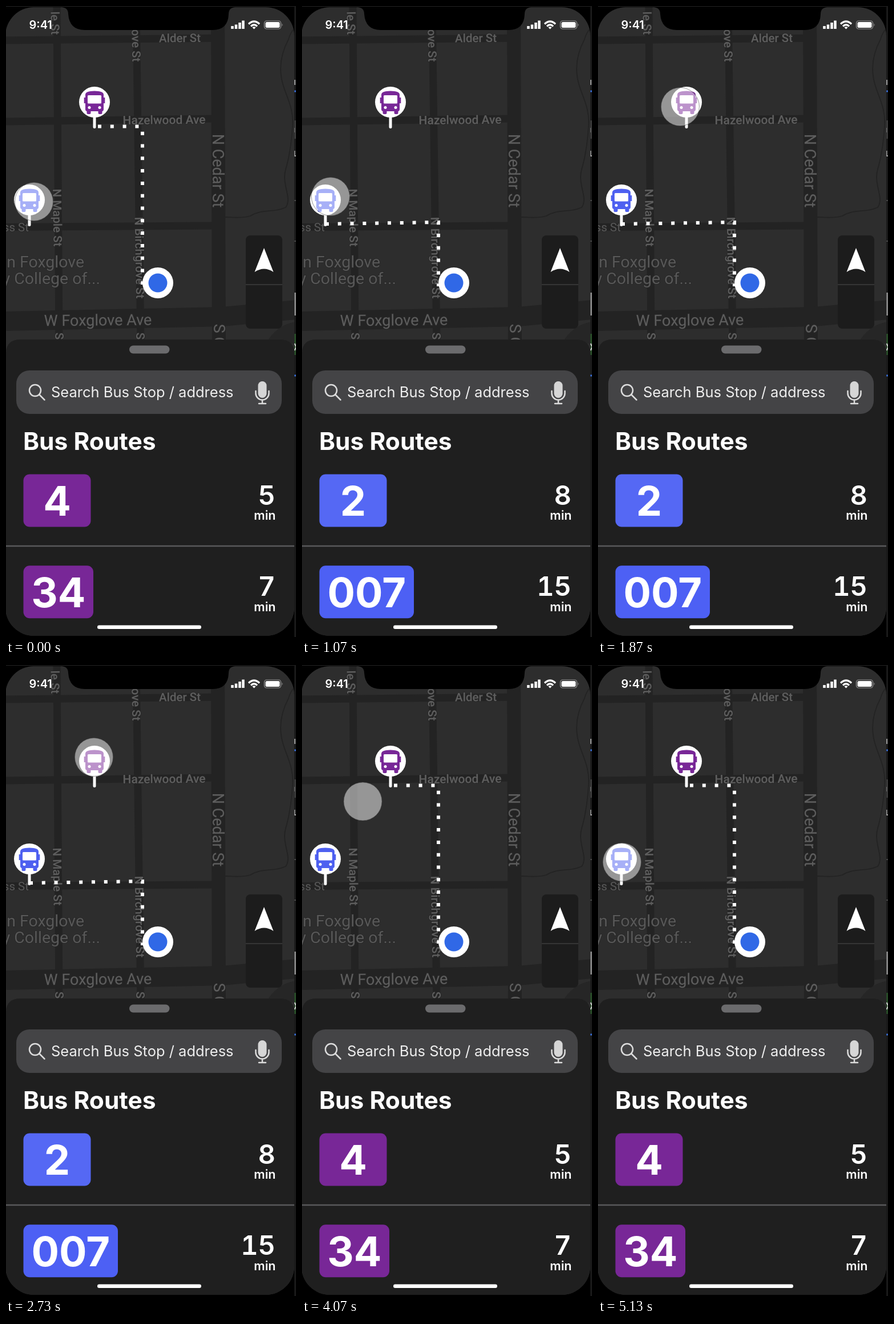
Write an HTML page that moves like this. It is 508 by 1103 pixels and loops after 5.19 s.

```html
<!DOCTYPE html>
<html lang="en">
<head>
<meta charset="utf-8">
<title>Bus stops</title>
<style>
  html, body { margin: 0; width: 100%; height: 100%; overflow: hidden; background: #000; }
  svg { display: block; width: 508px; height: 1103px; }
  text { font-family: Inter, "Liberation Sans", sans-serif; fill: #fff; }
  #labels text {
    font-family: Roboto, "Open Sans", sans-serif; font-weight: 500; fill: #5e5e5e;
    stroke: #282828; stroke-width: 2px; paint-order: stroke; text-anchor: middle;
  }
  #labels .wide { font-weight: 400; }
  #labels .place { font-weight: 400; fill: #585858; text-anchor: end; }
  #roads path { fill: none; stroke: #232323; }
  .route { fill: none; stroke: #fff; stroke-width: 6; stroke-dasharray: 6 15.8; }
  .num { font-size: 72px; font-weight: 700; text-anchor: middle; }
  .wait { font-size: 47px; font-weight: 600; text-anchor: end; font-variant-numeric: tabular-nums; }
  .min { font-size: 21.5px; font-weight: 600; text-anchor: end; }
</style>
</head>
<body>
<svg viewBox="0 0 508 1103">
  <defs>
    <clipPath id="screen"><rect x="-1" y="2" width="506" height="1099" rx="50"/></clipPath>
    <g id="bus">
      <path d="M-16 -13Q-16 -19.500 0 -19.500T16 -13V12.500Q16 16 12.500 16H-12.500Q-16 16 -16 12.500Z"/>
      <path d="M-18.300 -8h3v10h-3zM15.300 -8h3v10h-3zM-13.500 15h7v4q0 2-2 2h-3q-2 0-2-2zM6.500 15h7v4q0 2-2 2h-3q-2 0-2-2z"/>
      <g fill="#fff">
        <rect x="-12" y="-12" width="24" height="14.500" rx="1.500"/>
        <circle cx="-9" cy="9.500" r="2.500"/><circle cx="9" cy="9.500" r="2.500"/>
      </g>
    </g>
    <g id="pin">
      <path d="M0 25V43.500" stroke="#fff" stroke-width="5" stroke-linecap="round"/>
      <circle r="27" fill="#fff"/>
      <use href="#bus"/>
    </g>
  </defs>

  <!-- window edge beside the phone -->
  <rect width="508" height="1103" fill="#000"/>
  <path d="M0 .5H508" stroke="#242424"/>
  <rect x="505" width="3" height="1103" fill="#191919"/>
  <g fill="none" stroke-width="2">
    <path d="M506 129v9M506 213v8M505.500 253v9h3" stroke="#999"/>
    <path d="M505 149h3M505 646h3" stroke="#3565c4" stroke-width="3"/>
    <path d="M506.500 200v32M505 340h3M505 411h3" stroke="#444"/>
    <path d="M506.500 501v40" stroke="#aaa"/>
    <path d="M506.500 573v37" stroke="#274a27" stroke-width="3"/>
    <path d="M505.500 590l3 6l-3 6" stroke="#ccc"/>
  </g>

  <g clip-path="url(#screen)">
    <rect width="505" height="1103" fill="#2d2d2d"/>
    <g id="roads">
      <path d="M0 60L383 56M0 202L362 197M0 386.500L361 384M89 0L93 590M228 0L236 590" stroke-width="13"/>
      <path d="M371 0L373 590" stroke-width="24"/>
      <path d="M0 551L380 543L508 531" stroke-width="34"/>
      <path d="M508 36C500 44 497 50 495 58C481 84 477 112 486 140C493 162 504 180 502 210C500 240 497 262 490 285C482 312 502 335 490 352C470 362 448 354 428 367C412 372 398 369 384 369" stroke-width="1.800"/>
      <path d="M455 590Q475 556 508 552V590Z" style="fill:#262626;stroke:none"/>
    </g>
    <g id="labels"></g>
    <path id="routeA" class="route" d="M161 210.500H239V487"/>
    <path id="routeB" class="route" d="M41 381L239 378V490"/>
    <use href="#pin" x="155" y="168" fill="#782797"/>
    <use href="#pin" x="41" y="339" fill="#4e60f0"/>
    <circle cx="266" cy="484" r="27" fill="#fff"/>
    <circle cx="266" cy="484" r="16.500" fill="#3068e6"/>

    <rect x="420" y="401" width="64" height="163" rx="8" fill="#1c1c1c"/>
    <path d="M420 487H484" stroke="#353535" stroke-width="2"/>
    <path d="M452 423L468.500 465Q452 454 435.500 465Z" fill="#fff"/>

    <path d="M0 1103V606Q1 583 25 583H480Q504 583 505 606V1103Z" fill="#1f1f1f"/>
    <rect x="216" y="593.500" width="70.500" height="14" rx="7" fill="#6b6b6d"/>
    <rect x="18" y="637" width="465" height="76" rx="23" fill="#444446"/>
    <g fill="none" stroke="#dcdcdc" stroke-width="2.500" stroke-linecap="round">
      <circle cx="51" cy="672" r="10"/>
      <path d="M58.500 679.500L67.500 688.500"/>
      <path d="M437.500 673v4a11.500 11.500 0 0 0 23 0v-4M449 689v6M443 695h12"/>
    </g>
    <rect x="441.500" y="656" width="15" height="29" rx="7.500" fill="#d6d6d6"/>
    <text x="79" y="684" font-size="25.500" style="fill:#eee">Search Bus Stop / address</text>
    <text x="30" y="775.500" font-size="42.500" font-weight="700">Bus Routes</text>
    <path d="M0 944H505" stroke="#59595b" stroke-width="2.500"/>
    <g id="rows"></g>
    <rect x="160" y="1082.500" width="182" height="6.500" rx="3.200" fill="#fff"/>

    <path d="M98 0V2Q109 3 109 14Q111 42 138 42H362Q389 42 390 14Q390 3 401 2V0Z" fill="#000"/>
    <text x="40.500" y="40" font-size="20" font-weight="600">9:41</text>
    <path d="M396.500 40v-5M403 40v-7.500M409.500 40v-11M415.500 40v-14.500" stroke="#fff" stroke-width="4.500"/>
    <g fill="none" stroke="#fff" stroke-width="3.200">
      <path d="M425 31.500Q434.500 22.500 444 31.500M429 35.500Q434.500 30 440 35.500"/>
    </g>
    <path d="M431.500 37.500Q434.500 35 437.500 37.500L434.500 40.500Z" fill="#fff"/>
    <rect x="452.500" y="26" width="29" height="14" rx="4" fill="none" stroke="#999" stroke-width="1.200"/>
    <rect x="454.500" y="28" width="25" height="10" rx="2.500" fill="#fff"/>
    <path d="M483.500 30.500q2 2.500 0 5z" fill="#999"/>
  </g>
  <circle id="touch" r="33.500" fill="#fff" fill-opacity=".5" stroke="#444" stroke-opacity=".55"/>
</svg>
<script>
  const LOOP = 5190, TICK = 1000 / 15;
  const $ = id => document.getElementById(id);

  function add(parent, tag, attrs, content = "") {
    const el = document.createElementNS("http://www.w3.org/2000/svg", tag);
    for (const key in attrs) el.setAttribute(key, attrs[key]);
    el.textContent = content;
    return parent.appendChild(el);
  }

  // text, centre x, centre y, size, angle
  const labels = [
    ["Alder St", 304.5, 56, 20.5, -0.5],
    ["Hazelwood Ave", 277, 199, 21, -0.5],
    ["W Foxglove Ave", 161, 549, 27, -0.5],
    ["N Cedar St", 371, 288, 27, 90],
    ["N Maple St", 90, 370, 20.5, 89],
    ["N Birchgrove St", 234, 440, 20.5, 89],
    ["le St", 86, 30, 20.5, 89],
    ["ove St", 228, 69, 20.5, 89],
    ["S", 93, 577, 20.5, 90],
    ["S", 235, 577, 20.5, 90],
    ["S C", 373, 576, 27, 90]
  ];
  for (const [text, x, y, size, angle] of labels)
    add($("labels"), "text", {
      class: size > 25 ? "wide" : "",
      transform: `translate(${x} ${y}) rotate(${angle})`, y: size * 0.35, "font-size": size
    }, text);

  const places = [["oss St", 40, 394, 20.5], ["n Foxglove", 137, 457, 28.5], ["y College of...", 165, 486, 28.5]];
  for (const [text, x, y, size] of places)
    add($("labels"), "text", { class: "place", x, y, "font-size": size }, text);

  // route number, tile width, tile colour, wait
  const boards = [
    [["4", 118, "#782797", 5], ["34", 122.5, "#782797", 7]],
    [["2", 118, "#5568f4", 8], ["007", 165.5, "#4d60f4", 15]]
  ].map(rows => {
    const group = add($("rows"), "g", {});
    rows.forEach(([name, width, fill, wait], i) => {
      const y = 818.5 + 159.7 * i;
      add(group, "rect", { x: 30.5, y, width, height: 92, rx: 11, fill });
      add(group, "text", { class: "num", x: 30.5 + width / 2, y: y + 72.5 }, name);
      add(group, "text", { class: "wait", x: 472, y: y + 53 }, wait);
      add(group, "text", { class: "min", x: 472.5, y: y + 79.5 }, "min");
    });
    return group;
  });

  // time, x, y of the touch point
  const path = [
    [0, 49, 342], [270, 46, 341], [1000, 46, 341], [1067, 50, 333],
    [1533, 103, 237], [1867, 144, 176], [2067, 154, 162], [2333, 154.3, 161.3],
    [2533, 154, 161], [3533, 154, 161], [3667, 149, 170], [4067, 106.5, 238.5],
    [4600, 68, 308], [4867, 52, 332], [5133, 42, 344.5]
  ];

  function touchAt(t) {
    const next = path.findIndex(p => p[0] > t);
    if (next < 0) return path[path.length - 1].slice(1);
    const a = path[next - 1], b = path[next], k = (t - a[0]) / (b[0] - a[0]);
    return [a[1] + (b[1] - a[1]) * k, a[2] + (b[2] - a[2]) * k];
  }

  const show = (el, on) => { el.style.display = on ? "" : "none"; };

  function draw(ms) {
    // motion advances in 15 steps a second
    const t = Math.floor((ms + 4) / TICK) * TICK;
    const [x, y] = touchAt(t);
    $("touch").setAttribute("transform", `translate(${x} ${y})`);
    const blue = ms >= 400 && ms < 2796;
    show($("routeA"), !blue);
    show($("routeB"), blue);
    show(boards[0], !blue);
    show(boards[1], blue);
  }

  const start = performance.now();
  function tick() {
    draw((performance.now() - start) % LOOP);
    requestAnimationFrame(tick);
  }
  tick();
</script>
</body>
</html>
```
